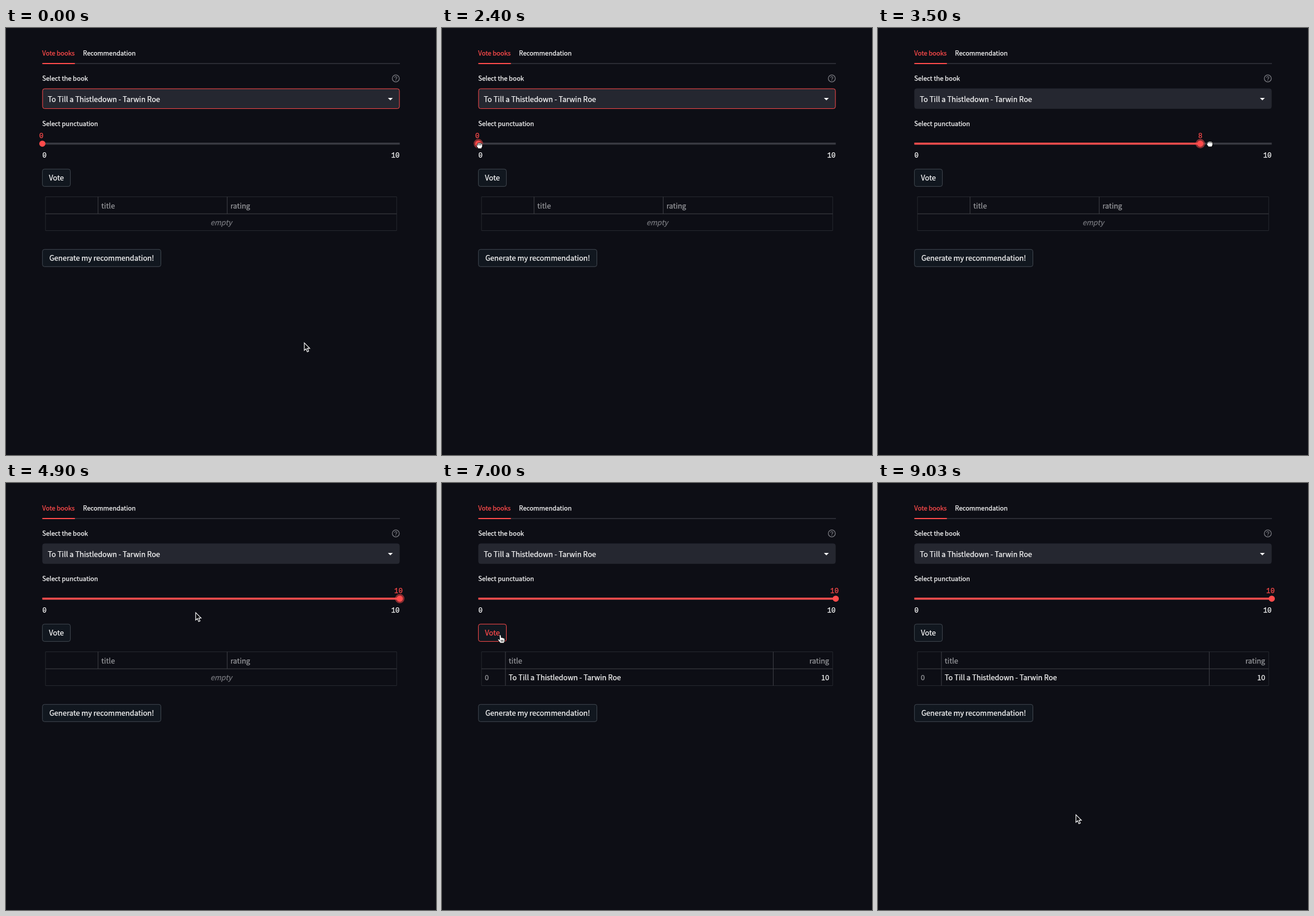
Animation of 751x745 px, one loop 9.16 s. Source, as an HTML page:

```html
<!DOCTYPE html>
<html lang="en">
<head>
<meta charset="utf-8">
<title>Book votes</title>
<style>
html, body { margin: 0; width: 100%; height: 100%; overflow: hidden; background: #0d0e15; }
svg { display: block; width: 751px; height: 745px; }
text {
  font: 12.6px "Noto Sans CJK JP", "Noto Sans CJK SC", "Noto Sans", sans-serif;
  color: #fafafa; fill: currentColor; stroke: currentColor; stroke-width: .25px;
  white-space: pre;
}
.small { font-size: 11.05px; }
.mono { font: 12.3px "Liberation Mono", "DejaVu Sans Mono", monospace; }
.red { color: #ff4b4b; }
.dim { color: #999a9e; }
.empty { color: #77787e; font-style: italic; }
.mid { text-anchor: middle; }
.end { text-anchor: end; }
.btn { fill: #11171f; stroke: #414850; }
.hot .btn { stroke: #ff4b4b; }
.hot text { color: #ff4b4b; }
.down .btn { fill: #ff4b4b; }
.down text { color: #fafafa; }
.frame { fill: none; stroke: #26282f; }
.rule { fill: none; stroke: #404248; }
.track { stroke: #383941; stroke-width: 3.5; }
.hand { fill: #fff; stroke: #000; stroke-width: .9; stroke-linejoin: round; }
.crease { fill: none; stroke: #000; stroke-width: .8; }
</style>
</head>
<body>
<svg viewBox="0 0 751 745">
  <text class="small red" x="63.3" y="48">Vote books</text>
  <text class="small" x="134.5" y="48">Recommendation</text>
  <path d="M63.5 62H688" stroke="#292a33" stroke-width="1.8"/>
  <path d="M63.5 62H120.3" stroke="#ff4b4b" stroke-width="1.8"/>

  <text class="small" x="63.3" y="92.3">Select the book</text>
  <circle cx="680.8" cy="88" r="6.1" fill="none" stroke="#797a80" stroke-width="1.3"/>
  <path d="M678.9 86.7a1.9 1.9 0 1 1 2.9 1.6q-1 .6-1 1.4M680.8 90.8v1.2" fill="none" stroke="#797a80" stroke-width="1.2"/>
  <rect id="select" x="63.9" y="106" width="623.2" height="34.6" rx="3.5" fill="#252730"/>
  <text x="73" y="129">To Till a Thistledown - Tarwin Roe</text>
  <path d="M667 121.9H675.6L671.3 126.3Z" fill="#fafafa"/>

  <text class="small" x="63.3" y="170.5">Select punctuation</text>
  <path class="track" d="M63.5 201.8H687.7"/>
  <path id="bar" class="track" style="stroke:#ff4b4b"/>
  <circle id="ring" cy="201.8" r="8.2" fill="#ff4b4b" opacity=".5"/>
  <circle id="thumb" cy="201.8" r="5.4" fill="#ff4b4b"/>
  <text id="value" class="mono red mid" y="191.6"></text>
  <text class="mono" x="63.5" y="226.3">0</text>
  <text class="mono end" x="687.5" y="226.3">10</text>

  <g id="vote">
    <rect class="btn" x="63.6" y="246.2" width="48.8" height="30.2" rx="3.5"/>
    <text class="mid" x="88" y="266">Vote</text>
  </g>

  <path class="frame" d="M69 294.5H682.3V353.5H69Z"/>
  <path class="rule" d="M69 324.2H682.3"/>
  <g id="blank">
    <path class="rule" d="M160.8 294.5V324M386.3 294.5V324"/>
    <text class="dim" x="166.6" y="314.7">title</text>
    <text class="dim" x="392" y="314.7">rating</text>
    <text class="empty mid" x="375.7" y="344">empty</text>
  </g>
  <g id="filled">
    <path class="rule" d="M110.8 294.5V353.5M578.6 294.5V353.5"/>
    <text class="dim" x="116.5" y="314.7">title</text>
    <text class="dim end" x="676.2" y="314.7">rating</text>
    <text class="dim" x="74.7" y="344">0</text>
    <text x="116.5" y="344">To Till a Thistledown - Tarwin Roe</text>
    <text class="end" x="676.2" y="344">10</text>
  </g>

  <rect class="btn" x="63.7" y="386.3" width="206.8" height="30" rx="3.5"/>
  <text class="mid" x="167.1" y="406">Generate my recommendation!</text>

  <g id="expand">
    <circle cx="712.2" cy="303.4" r="17.6" fill="#151921"/>
    <path d="M711 302L707 298M706.7 301.8V297.4H711M713.6 304.4L717.6 308.4M717.9 304.6V309H713.6" fill="none" stroke="#a2a4a8" stroke-width="1.5"/>
  </g>

  <g id="cursor">
    <path id="arrow" d="M0 .3V13.4L3 10.7L5.2 16L7.6 15L5.4 9.8H9.5Z" fill="#08090d" stroke="#fff" stroke-width="1.15"/>
    <g id="point">
      <path class="hand" d="M-1.4.6Q0-.9 1.4.6L2 5Q3.3 4 4.2 5.2Q5.6 4.6 6.3 5.9Q7.8 5.6 8.1 7.2V10.5L6.8 14.2H.2L-4 8.6Q-4 6.8-2.4 7.2L-.9 8.6Z"/>
      <path class="crease" d="M1.6 8.6V12M3.4 8.6V12M5.2 8.6V12"/>
    </g>
    <g id="open">
      <path class="hand" d="M-3.8-3Q-3.2-5-1.8-3.8Q-1-6.4.5-4.2Q2-5.8 2.8-3.5Q4.8-4.2 5-1.8V1.6L3.2 5.6H-2L-5.5.6Q-5-1.4-3.4-.4Z"/>
      <path class="crease" d="M-1.6-3.4L-1-.2M.7-3.8V-.4M2.8-3.2L2.4 0"/>
    </g>
    <g id="fist">
      <path class="hand" d="M-4-2Q-3.6-4.6-1.8-3.8Q-.6-5.2.8-4Q2.2-5 3.2-3.4Q5.2-3.6 5.2-1.2V1.6L3.6 5H-2.2L-5 1.4Q-5.4-.8-4-.8Z"/>
      <path class="crease" d="M-1.6-3.4V-1.2M.8-3.6V-1.2M3-3V-1"/>
    </g>
  </g>
</svg>
<script>
const LOOP = 9160, STEP = 100, LEFT = 63.5, UNIT = 62.42;
const GRAB = 2400, RELEASE = 4300, PRESS = 6000, ADDED = 6600;
const $ = id => document.getElementById(id);
const show = (id, on) => $(id).style.display = on ? "" : "none";
const clamp = (v, lo, hi) => Math.max(lo, Math.min(hi, v));
const ease = p => p * p * (3 - 2 * p);

// pointer moves: start and end time, then the place reached
const moves = [
  [300, 1000, 139, 246.5],
  [1000, 1300, 133, 222],
  [1300, 1700, 262, 117],
  [1700, 2100, 65.5, 205],
  [GRAB, 3950, 711, 201.5],
  [RELEASE, 5300, 125, 239],
  [5300, 5700, 101.5, 265],
  [7700, 8700, 345.7, 578.5]
];

function pointer(t) {
  let x = 521, y = 549;
  for (const [from, to, toX, toY] of moves) {
    const p = ease(clamp((t - from) / (to - from), 0, 1));
    x += (toX - x) * p;
    y += (toY - y) * p;
  }
  return [x, y];
}

// fades in after a and out before b
const pulse = (t, a, b) => clamp(Math.min(t - a, b - t) / 200, 0, 1);

function draw(t) {
  const [x, y] = pointer(t);
  const inside = (l, top, r, b) => x > l && x < r && y > top && y < b;
  const held = t > GRAB && t <= RELEASE;

  $("select").setAttribute("stroke", t <= GRAB ? "#ff4b4b" : "#252730");

  const dragged = clamp(Math.round((x - LEFT) / UNIT), 0, 10);
  const value = t <= GRAB ? 0 : held ? dragged : 10;
  const pos = LEFT + value * UNIT;
  $("bar").setAttribute("d", `M${LEFT} 201.8H${pos}`);
  $("thumb").setAttribute("cx", pos);
  $("ring").setAttribute("cx", pos);
  show("ring", t >= 2100 && t < PRESS);
  $("value").textContent = value;
  $("value").setAttribute("x", clamp(pos, 61.7, 685.4) - (value ? 0 : 1.8));

  const overVote = inside(63, 246, 113, 277);
  const pressed = t >= PRESS && t < PRESS + STEP;
  $("vote").setAttribute("class", (overVote ? "hot" : "") + (pressed ? " down" : ""));

  show("blank", t < ADDED);
  show("filled", t >= ADDED);
  $("expand").style.opacity = pulse(t, 600, 1250) + pulse(t, 7800, 8500);

  const shape = held ? "fist"
    : t >= 2100 && t <= GRAB ? "open"
    : overVote || inside(63, 106, 688, 141) ? "point" : "arrow";
  for (const id of ["arrow", "point", "open", "fist"]) show(id, id === shape);
  $("cursor").setAttribute("transform", `translate(${x} ${y})`);
}

const start = performance.now();
function tick() {
  const t = (performance.now() - start) % LOOP;
  draw(Math.floor(t / STEP) * STEP);
  requestAnimationFrame(tick);
}
tick();
</script>
</body>
</html>
```
